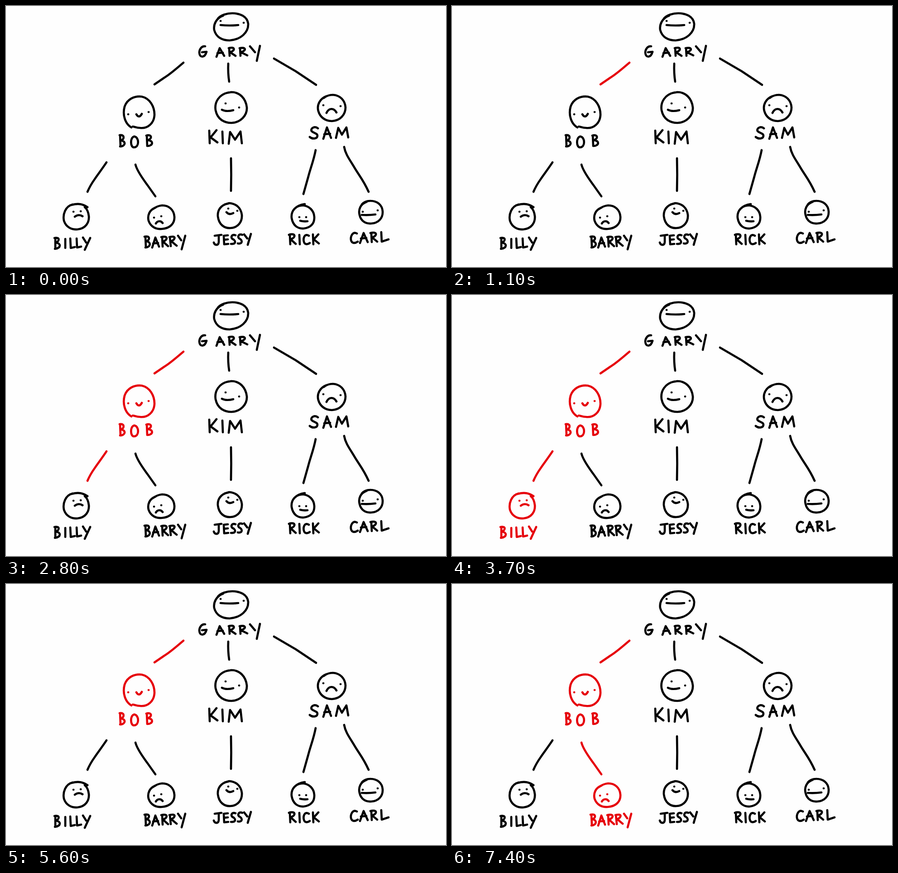
An HTML page that plays this animation: 972x576 px, repeating every 8000 ms.

```html
<!DOCTYPE html>
<html lang="en">
<head>
<meta charset="utf-8">
<title>Family tree walk</title>
<style>
  html, body { margin: 0; width: 100%; height: 100%; overflow: hidden; background: #fefefe; }
  svg { display: block; width: 972px; height: 576px; }
  path { fill: none; stroke: #000; stroke-width: 4.7; stroke-linecap: round; stroke-linejoin: round; }
</style>
</head>
<body>
<svg viewBox="0 0 972 576"></svg>
<script>
// Each person: head outline, face (dots and mouth), hand lettering.
const people = {
  Garry: [
    'M480 21C464 27 458 41 460 53C464 69 478 76 494 76C519 74 536 58 535 39C533 23 517 16 500 16C488 16 474 20 468 28',
    'M474 33h.1M525 37h.1M474 42Q494 44 513 42',
    'M440 89C431 88 427 97 427 103C428 115 439 115 443 101L433 102M465 112L472 93L482 110M467 104L479 103M493 93L494 110M492 93C505 89 508 98 495 102L507 110M517 93L518 110M516 93C530 90 532 98 519 102L533 109M539 89L550 102M561 88L554 121'],
  Bob: [
    'M277 268C263 260 257 240 262 222C268 205 284 198 300 200C318 204 328 222 328 240C327 260 312 271 296 269C288 269 283 266 280 266',
    'M270 239h.1M315 234h.1M288 239Q294 249 300 238',
    'M252 285L253 310M251 285C262 283 262 294 254 297C266 298 264 310 252 310M283 288C274 290 274 312 283 312C295 311 294 290 284 288M311 286L312 309M310 286C323 282 323 294 313 296C327 297 325 309 312 309'],
  Kim: [
    'M491 191C471 195 460 212 463 230C467 250 482 258 498 258C518 257 533 242 532 224C530 204 516 190 498 190L487 192',
    'M485 215h.1M515 224h.1M477 229Q486 234 502 230',
    'M449 275L450 303M465 274L452 290L467 301M478 277L479 303M492 304L495 278L506 295L518 277L521 303'],
  Sam: [
    'M708 199C694 204 686 218 690 232C694 246 706 254 720 254C738 253 750 240 750 224C749 208 738 197 722 196C714 196 707 199 702 203',
    'M701 219h.1M739 221h.1M708 236C713 225 724 224 730 235',
    'M689 270C682 264 672 270 675 276C680 281 688 281 688 286C688 294 676 294 671 289M701 293L709 268L718 291M703 283L716 282M729 291L734 269L742 284L752 268L756 290'],
  Billy: [
    'M147 438C131 442 125 460 128 474C133 489 146 494 158 493C176 491 184 478 183 464C182 455 179 448 174 444M180 444C170 437 160 435 145 439',
    'M149 454h.1M165 453h.1M152 465C158 460 165 461 169 464',
    'M109 512V536M107 512C120 510 118 519 110 522C122 524 122 534 108 536M131 514V534M142 513L143 534L152 532M156 513L157 533L166 531M170 511L177 522M186 512L174 538'],
  Barry: [
    'M330 445C317 450 312 462 315 474C320 488 332 493 344 492C362 491 373 480 372 465C371 450 360 440 345 440Q334 441 325 448',
    'M327 467h.1M343 464h.1M331 480C335 473 343 474 346 479',
    'M308 509L309 533M306 509C319 506 318 517 310 519C321 521 320 532 308 533M323 533L330 511L338 531M325 524L336 523M345 510L346 531M343 510C358 506 358 516 347 520L358 530M362 510L364 530M361 510C376 506 375 515 365 519L377 529M380 507L387 517M396 507L388 537'],
  Jessy: [
    'M491 436C474 439 467 451 468 464C470 482 482 491 496 490C513 489 522 476 521 461C519 445 508 436 493 435L483 438',
    'M491 447h.1M511 452h.1M487 455Q493 462 502 457',
    'M461 507L476 505M470 506V521C469 530 461 528 459 522M490 506L481 507L482 526L491 525M482 516L490 515M507 506C499 503 496 510 500 514C508 517 509 526 497 525M522 505C514 502 511 509 515 513C523 517 523 526 512 524M526 504L533 513M541 503L534 527'],
  Rick: [
    'M660 437C640 440 629 452 631 468C634 485 645 492 658 491C674 489 682 479 681 465C680 451 670 442 657 440C649 440 642 443 638 447',
    'M648 466h.1M663 466h.1M650 474Q658 476 666 475',
    'M627 504L628 526M625 505C640 500 641 511 629 515L640 525M648 505L649 526M669 507C660 501 656 512 658 520C660 528 667 526 671 523M678 504L679 526M690 504L680 515L691 524'],
  Carl: [
    'M797 432C783 437 778 449 781 461C784 475 795 481 807 480C823 479 833 468 832 453C831 439 820 430 805 430C797 430 790 433 786 438',
    'M788 454h.1M821 451h.1M786 461Q801 462 816 460',
    'M775 502C766 497 761 508 762 516C764 525 771 524 777 520M782 523L790 501L799 521M784 513L796 512M807 501L808 521M805 501C820 497 821 507 809 511L820 520M829 499L830 520L845 515']
};

const links = {
  garryBob: 'M392 125C372 142 362 151 350 158L328 173',
  garryKim: 'M491 127Q490 148 493 167',
  garrySam: 'M592 116L640 144L685 174',
  bobBilly: 'M222 345C212 360 202 373 196 382Q186 396 180 410',
  bobBarry: 'M286 350C290 366 306 386 313 396L330 420',
  kimJessy: 'M497 336Q498 372 497 408',
  samRick: 'M684 318C680 340 672 360 668 376L657 415',
  samCarl: 'M747 311C750 328 760 340 770 357S790 385 801 410'
};

const svg = document.querySelector('svg');
const parts = {};
function draw(name, d) {
  const p = document.createElementNS('http://www.w3.org/2000/svg', 'path');
  p.setAttribute('d', d);
  svg.append(p);
  parts[name] = p;
}
for (const name in people) draw(name, people[name].join(''));
for (const name in links) draw(name, links[name]);

// [part, start of change, time when fully changed, turns red?]
const steps = [
  ['garryBob', 900, 1100, 1],
  ['Bob', 1800, 2000, 1],
  ['bobBilly', 2700, 2800, 1],
  ['Billy', 3600, 3700, 1],
  ['Billy', 4500, 4700, 0],
  ['bobBilly', 5400, 5600, 0],
  ['bobBarry', 6300, 6300, 1],
  ['Barry', 7200, 7400, 1]
];

function frame(now) {
  const t = now % 8000, red = {};
  for (const [name, start, end, on] of steps) {
    red[name] ??= 0;
    if (t >= start) red[name] = t < end ? 0.5 : on;
  }
  for (const name in red) {
    const k = red[name];
    parts[name].style.stroke = `rgb(${230 * k},0,${10 * k})`;
  }
  requestAnimationFrame(frame);
}
frame(performance.now());
</script>
</body>
</html>
```
